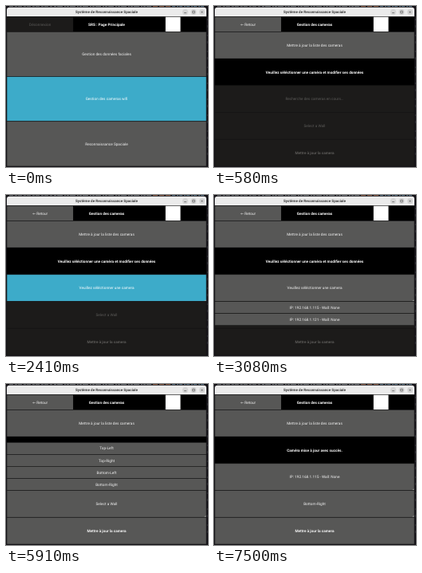
These frames come from a looping animation (253 by 202 pixels, 8000 ms). An HTML page:

```html
<!DOCTYPE html>
<html lang="fr">
<head>
<meta charset="utf-8">
<title>Reconnaissance Spaciale</title>
<style>
  html, body { margin: 0; width: 100%; height: 100%; overflow: hidden; background: #111; }
  svg { display: block; width: 100%; height: 100%; }
  text { font: 4.74px Roboto, "Noto Sans", sans-serif; text-anchor: middle; text-rendering: geometricPrecision; }
  .bold { font-weight: 700; }
  .bar { font-size: 4.6px; }
  .arrow { font-family: "DejaVu Sans", sans-serif; }
</style>
</head>
<body>
<svg viewBox="0 0 253 202" preserveAspectRatio="none">
  <defs><clipPath id="client"><rect x="1" y="13.3" width="250" height="187.7"/></clipPath></defs>
  <rect width="253" height="202" fill="#141217"/>
  <g fill="none" stroke-width="1.2">
    <path d="M4 .5H58" stroke="#55585c" stroke-dasharray="5 2 3 1"/>
    <path d="M60 .5H182" stroke="#62666b" stroke-dasharray="3 1 7 2 2 1"/>
    <path d="M184 .5H206" stroke="#80543f" stroke-dasharray="6 2"/>
    <path d="M208 .5H250" stroke="#4c6678" stroke-dasharray="4 2 2 1"/>
    <path d="M252.3 16V196" stroke="#34343a" stroke-dasharray="2 6 3 9" stroke-width=".8"/>
  </g>
  <path d="M1 13.4V5Q1 1.7 4.3 1.7H247.7Q251 1.7 251 5V13.4Z" fill="#ebebeb"/>
  <text class="bold bar" x="126" y="9.3" fill="#3a3a3a">Système de Reconnaissance Spaciale</text>
  <g fill="#d6d6d6">
    <circle cx="224.5" cy="7.6" r="3.6"/><circle cx="235" cy="7.6" r="3.6"/><circle cx="245.5" cy="7.6" r="3.6"/>
  </g>
  <path d="M223 8.6h3M233.7 6.3h2.6v2.6h-2.6zM244.3 6.4l2.4 2.4m0-2.4l-2.4 2.4" fill="none" stroke="#444" stroke-width=".6"/>
  <g id="stage" clip-path="url(#client)"></g>
</svg>
<script>
const LOOP = 8000, LEFT = 1, WIDTH = 250, TOP = 13.6, BOTTOM = 201;
const HEAD = (BOTTOM - TOP) / 10, BODY = TOP + HEAD, ITEM = 15.07;
const STYLES = {
  normal: ['#575756', '#f4f4f4'],
  down: ['#3dabc9', '#ffffff'],
  off: ['#1c1b1a', '#5c5b59'],
  label: ['#000000', '#ffffff']
};
const stage = document.getElementById('stage');

function cell(x, y, w, h, label, style = 'normal', bold = false) {
  const [fill, ink] = STYLES[style];
  const edge = style === 'label' ? '' : ' stroke="#151515" stroke-width=".6"';
  return `<rect x="${x}" y="${y}" width="${w}" height="${h}" fill="${fill}"${edge}/>` +
    `<text x="${x + w / 2}" y="${y + h / 2 + 1.65}" fill="${ink}"${bold ? ' class="bold"' : ''}>${label}</text>`;
}

function header(button, style, title) {
  const w = WIDTH / 3;
  return `<rect x="${LEFT}" y="${TOP - 1}" width="${WIDTH}" height="${HEAD + 1}" fill="#000"/>` +
    cell(LEFT, TOP, w, HEAD, button, style) +
    cell(LEFT + w, TOP, w, HEAD, title, 'label', true) +
    `<rect x="199.8" y="${TOP}" width="18.7" height="${HEAD}" fill="#fff"/>`;
}

function rows(list) {
  const h = (BOTTOM - BODY) / list.length;
  return list.map(([label, style, bold, spinner], i) => {
    const y = BODY + i * h;
    const mark = spinner
      ? `<path d="M250.3 ${y + h - 2.4}v1.8h-1.8z" fill="${style === 'off' ? '#444' : '#a5a5a5'}"/>` : '';
    return cell(LEFT, y, WIDTH, h, label, style, bold) + mark;
  }).join('');
}

const dropdown = (y, labels, pressed = -1) => labels.map((label, i) =>
  cell(LEFT, y + i * ITEM, WIDTH, ITEM, label, i === pressed ? 'down' : 'normal')).join('');

function homeScreen(t) {
  return header('Déconnexion', 'off', 'SRS : Page Principale') + rows([
    ['Gestion des données faciales'],
    ['Gestion des cameras wifi', t < 160 ? 'down' : 'normal'],
    ['Reconnaissance Spaciale']
  ]);
}

function cameraScreen(t) {
  const within = (a, b) => t >= a && t < b;
  const found = t >= 1000, chosen = t >= 5080, updated = t >= 7500;
  const camera = chosen ? 'IP: 192.168.1.115 - Wall: None'
    : found ? 'Veuillez séléctionner une camera' : 'Recherche des cameras en cours...';
  const cameraStyle = !found ? 'off' : within(2410, 2500) ? 'down' : 'normal';
  const wallStyle = !chosen ? 'off' : within(5830, 5910) ? 'down' : 'normal';
  const sendStyle = !chosen ? 'off' : within(7410, 7500) ? 'down' : 'normal';
  const wallTop = BODY + (BOTTOM - BODY) * 3 / 5;

  let out = header('<tspan class="arrow">←</tspan> Retour', 'normal', 'Gestion des cameras') + rows([
    ['Mettre à jour la liste des cameras'],
    [updated ? 'Caméra mise à jour avec succès.' : 'Veuillez séléctionner une caméra et modifier ses données', 'label', true],
    [camera, cameraStyle, false, found],
    [t >= 6830 ? 'Bottom-Right' : 'Select a Wall', wallStyle, false, chosen],
    ['Mettre à jour la camera', sendStyle, true]
  ]);
  if (within(2500, 5080))
    out += dropdown(wallTop, ['IP: 192.168.1.115 - Wall: None', 'IP: 192.168.1.121 - Wall: None']);
  if (within(5910, 6830))
    out += dropdown(wallTop - 4 * ITEM, ['Top-Left', 'Top-Right', 'Bottom-Left', 'Bottom-Right'], t >= 6750 ? 3 : -1);
  return out;
}

// The slide eases out, shown in steps of 84 ms.
function slide(t) {
  if (t < 160) return 0;
  const shown = 160 + Math.floor((t - 160) / 84) * 84;
  const left = 1 - Math.min(1, (shown - 120) / 400);
  return 1 - left * left;
}

let last = '';
function render(t) {
  const p = slide(t);
  const shift = (x, content) => `<g transform="translate(${x.toFixed(2)} 0)">${content}</g>`;
  const next = (p < 1 ? shift(-p * WIDTH, homeScreen(t)) : '') +
    (p > 0 ? shift((1 - p) * WIDTH, cameraScreen(t)) : '');
  if (next !== last) stage.innerHTML = last = next;
}

const start = performance.now();
function tick() {
  render((performance.now() - start) % LOOP);
  requestAnimationFrame(tick);
}
tick();
</script>
</body>
</html>
```
